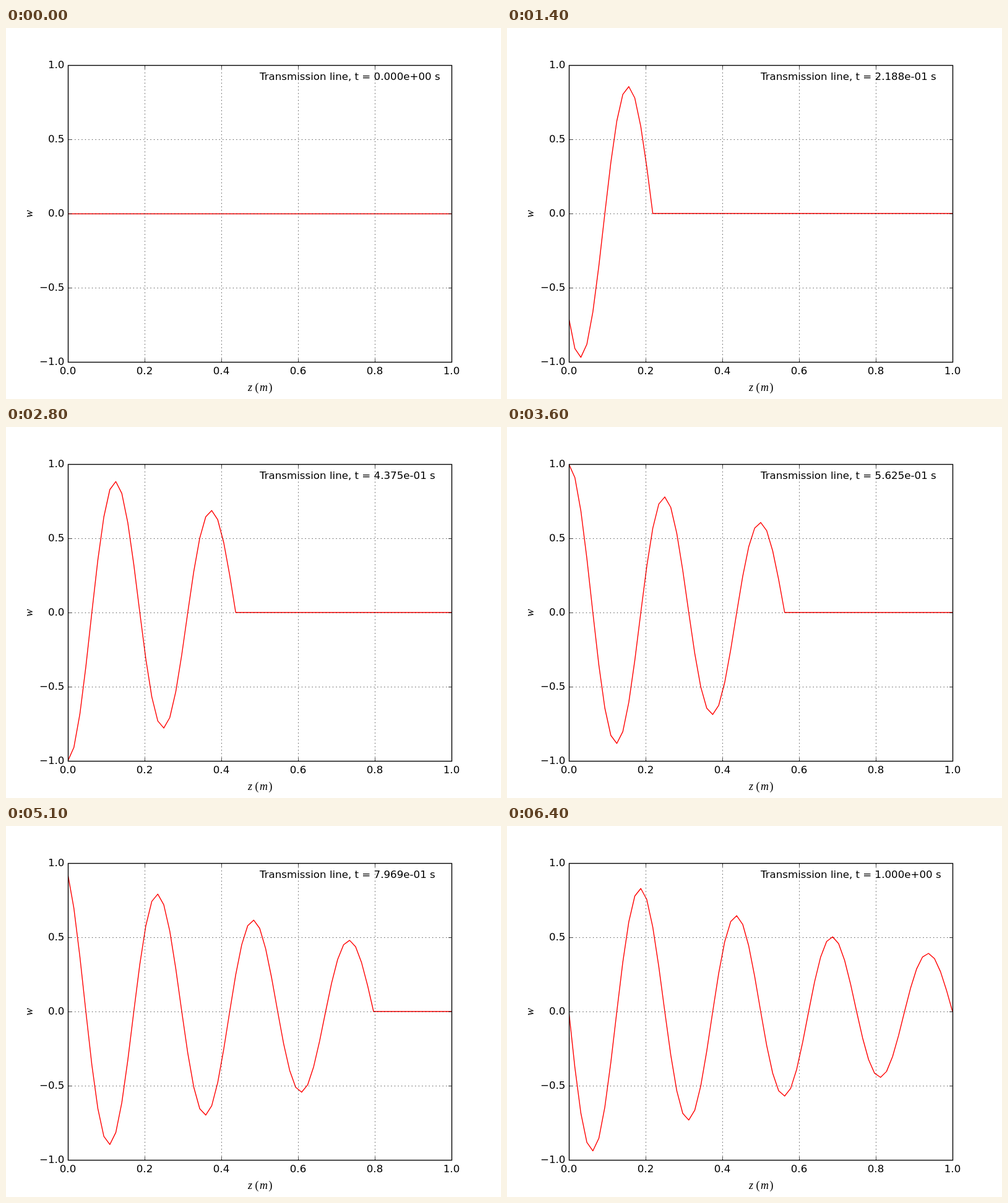
Recreate the animation shown at these times as an HTML page. Size 800 by 600 pixels, loop 6.5 s.

```html
<!DOCTYPE html>
<html lang="en">
<head>
<meta charset="utf-8">
<title>Transmission line</title>
<style>
  html, body { margin: 0; width: 100%; height: 100%; overflow: hidden; background: #fff; }
  svg { display: block; }
  text { font: 16.667px "DejaVu Sans", sans-serif; }
  .math { font: italic 18px "Liberation Serif", serif; }
  .upright { font-style: normal; }
  path, rect, polyline { fill: none; stroke: #000; }
  .grid { stroke-width: 0.694; stroke-dasharray: 1.389 4.167; }
  .tick { stroke-width: 0.694; }
  .frame { stroke-width: 1.389; }
  #wave { stroke: #f00; stroke-width: 1.389; stroke-linejoin: round; }
</style>
</head>
<body>
<svg width="800" height="600" viewBox="0 0 800 600">
  <clipPath id="plot"><rect x="100" y="60" width="620" height="480"/></clipPath>
  <polyline id="wave" clip-path="url(#plot)"/>
  <g id="axes"></g>
  <rect class="frame" x="100.5" y="60.5" width="620" height="480"/>
  <text id="caption" x="410" y="84"></text>
  <text class="math" y="586.5"><tspan x="391">z</tspan><tspan class="upright" x="402.5">(</tspan><tspan x="410">m</tspan><tspan class="upright" x="424.5">)</tspan></text>
  <text class="math" text-anchor="middle" transform="translate(43 300.5) rotate(-90)">w</text>
</svg>
<script>
const LEFT = 100, RIGHT = 720, TOP = 60, BOTTOM = 540;
const STEPS = 64, STEP_MS = 100, FREQUENCY = 4, TICK = 5.556;
const wave = document.getElementById('wave');
const caption = document.getElementById('caption');

const toX = z => LEFT + z * (RIGHT - LEFT);
const toY = w => (TOP + BOTTOM) / 2 - w * (BOTTOM - TOP) / 2;
const line = (kind, d) => `<path class="${kind}" d="${d}"/>`;
const label = (x, y, anchor, value) =>
  `<text x="${x}" y="${y}" text-anchor="${anchor}">${value.toFixed(1).replace('-', '−')}</text>`;

function drawAxes() {
  let markup = '';
  for (let i = 0; i <= 5; i++) {
    const x = toX(i / 5) + 0.5;
    markup += line('grid', `M${x} ${BOTTOM}V${TOP}`)
      + line('tick', `M${x} ${BOTTOM + 0.5}v${-TICK}M${x} ${TOP + 0.5}v${TICK}`)
      + label(x - 0.5, 560, 'middle', i / 5);
  }
  for (let i = -2; i <= 2; i++) {
    const y = toY(i / 2) + 0.5;
    markup += line('grid', `M${LEFT} ${y}H${RIGHT}`)
      + line('tick', `M${LEFT + 0.5} ${y}h${TICK}M${RIGHT + 0.5} ${y}h${-TICK}`)
      + label(94.4, y + 4.5, 'end', i / 2);
  }
  document.getElementById('axes').innerHTML = markup;
}

// Damped sine entering from the left at unit speed.
const amplitude = (z, t) =>
  z < t ? Math.exp(-z) * Math.sin(2 * Math.PI * FREQUENCY * (t - z)) : 0;

const scientific = t => t.toExponential(3).replace(/(\d)$/, '0$1');

let shown = -1;
function render() {
  const step = Math.floor(performance.now() / STEP_MS) % (STEPS + 1);
  if (step !== shown) {
    shown = step;
    const t = step / STEPS;
    const snap = step ? 0 : 0.5; // a flat line sits on the pixel grid
    wave.setAttribute('points', Array.from({ length: STEPS + 1 }, (_, i) =>
      `${toX(i / STEPS)},${(toY(amplitude(i / STEPS, t)) + snap).toFixed(2)}`).join(' '));
    caption.textContent = `Transmission line, t = ${scientific(t)} s`;
  }
  requestAnimationFrame(render);
}

drawAxes();
render();
</script>
</body>
</html>
```
